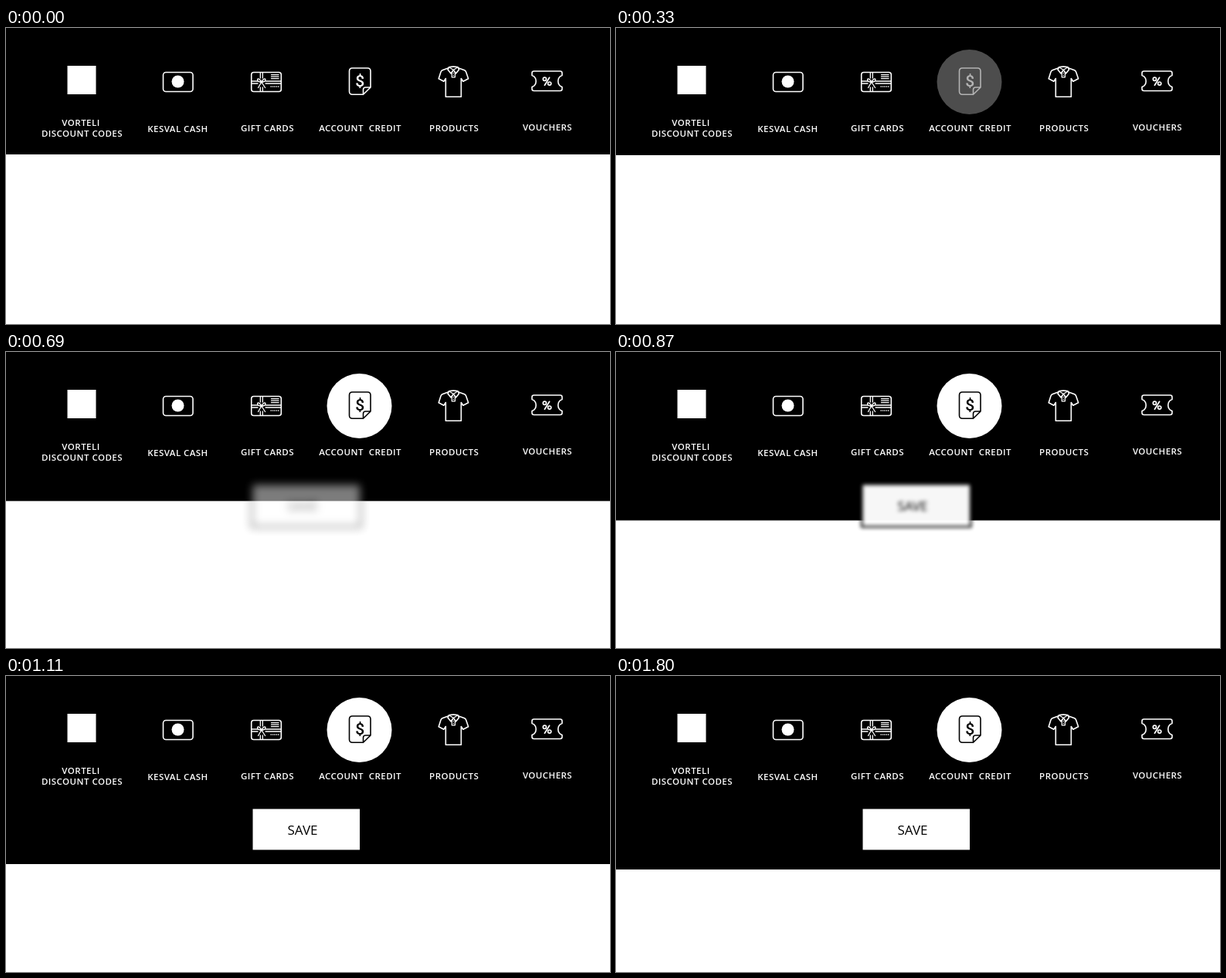
An HTML page for the animation above (1.83 s loop, 782 by 384 pixels).

```html
<!DOCTYPE html>
<html lang="en">
<head>
<meta charset="utf-8">
<title>Reward options</title>
<style>
  html, body { margin: 0; width: 100%; height: 100%; overflow: hidden; background: #fff; }
  svg { display: block; width: 100%; height: 100%; }
  .label {
    font: 600 11.5px "Open Sans", "Noto Sans", sans-serif;
    letter-spacing: .45px; text-anchor: middle; white-space: pre; fill: #fff;
  }
  .icon { fill: none; stroke: #fff; stroke-width: 1.6; stroke-linecap: round; stroke-linejoin: round; }
  .solid { fill: #fff; stroke: none; }
  .save { font: 17px "Open Sans", "Noto Sans", sans-serif; text-anchor: middle; }
  .dollar { font: 500 21px Roboto, sans-serif; text-anchor: middle; stroke: none; }
</style>
</head>
<body>
<svg viewBox="0 0 782 384">
  <defs>
    <filter id="soft" filterUnits="userSpaceOnUse" x="270" y="120" width="240" height="160" color-interpolation-filters="sRGB">
      <feGaussianBlur id="blur" stdDeviation="0"/>
    </filter>
  </defs>

  <rect id="panel" width="782" height="164"/>

  <!-- discount codes -->
  <rect class="solid" x="79.5" y="49" width="37" height="37"/>

  <!-- cash -->
  <g class="icon">
    <rect x="203.5" y="57.5" width="38.5" height="25" rx="3.5"/>
    <circle class="solid" cx="222.5" cy="69.5" r="8"/>
  </g>

  <!-- gift card -->
  <g class="icon">
    <rect x="317.7" y="57.5" width="38.6" height="25" rx="3"/>
    <g stroke-width="1.3">
      <path d="M318 69H326M318 72H326M336 69H356M336 72H356M329.3 58V65M332.3 58V65M329.3 77V82M332.3 77V82"/>
      <path d="M330.8 70Q325 70 325.5 66.5Q327.5 64.5 330.8 70Q334 64.5 336 66.5Q336.5 70 330.8 70L326.5 77.5M330.8 70L335.5 77.5"/>
      <path d="M343.5 60.7H353M343.5 63.2H353M343.5 65.7H353"/>
      <path d="M343 76H354" stroke-dasharray=".4 2"/>
    </g>
    <circle class="solid" cx="330.8" cy="70" r="1.8"/>
  </g>

  <!-- account credit -->
  <circle id="spot" cx="457.5" cy="70" r="42" fill="#fff" opacity="0"/>
  <g id="note" class="icon">
    <path d="M462.5 86.3H448.5Q444.5 86.3 444.5 82.3V56Q444.5 52 448.5 52H468Q472 52 472 56V77L462.5 86.3V80Q462.5 77 465.5 77H472"/>
    <text id="dollar" class="dollar" x="458.2" y="75.5">$</text>
  </g>

  <!-- products -->
  <g class="icon" stroke-width="1.5">
    <path d="M572.5 52L565 54.8Q563.6 55.4 563 57L560.2 65.7L566.8 69.2L569.3 65.5V89.3H589.3V65.5L591.8 69.2L598.6 65.7L595.6 57Q595 55.4 593.6 54.8L586 52"/>
    <path d="M573.5 50.8Q579.3 49.5 585 50.8L586.5 54L582.5 59L579.3 54.5L576 59L572 54Z"/>
    <path d="M573.5 50.8L579.3 54.5L585 50.8M577.2 58V63.8H581.4V58" stroke-width="1.2"/>
    <path d="M579.3 58.5V58.6M579.3 61.5V61.6" stroke-width="1.3"/>
  </g>

  <!-- vouchers -->
  <g class="icon">
    <path d="M683.5 56H717.5Q720 56 720 58.5V61.5A8 8 0 0 0 720 76.5V79Q720 81.5 717.5 81.5H683.5Q681 81.5 681 79V76.5A8 8 0 0 0 681 61.5V58.5Q681 56 683.5 56Z"/>
    <g stroke-width="1.7">
      <circle cx="697.4" cy="66.3" r="2.1"/>
      <circle cx="703.7" cy="72.1" r="2.1"/>
      <path d="M703.6 64.3L697.4 74.2"/>
    </g>
  </g>

  <g id="labels"></g>

  <g id="button" opacity="0">
    <rect x="317" y="170" width="143.5" height="58"/>
    <rect x="319.5" y="172.5" width="138.5" height="53" fill="#fff"/>
    <text class="save" x="384" y="206.2">SAVE</text>
  </g>
</svg>

<script>
  const LOOP = 1830, STEP = 30;
  const $ = id => document.getElementById(id);
  const set = (id, name, value) => $(id).setAttribute(name, value);

  const labels = [
    ["VORTELI", 97, 127.2], ["DISCOUNT CODES", 98.5, 140.8], ["KESVAL CASH", 222.5, 135.3],
    ["GIFT CARDS", 338.5, 134.3], ["ACCOUNT  CREDIT", 458.6, 134.1],
    ["PRODUCTS", 580.2, 134.1], ["VOUCHERS", 701, 133.4]
  ];
  for (const [text, x, y] of labels) {
    const el = document.createElementNS($("labels").namespaceURI, "text");
    el.setAttribute("class", "label");
    el.setAttribute("x", x);
    el.setAttribute("y", y);
    el.textContent = text;
    $("labels").append(el);
  }

  // Smooth curve through [time, value] keys, without overshoot and flat at both ends.
  function curve(...keys) {
    const slope = keys.slice(1).map(([t, v], i) => (v - keys[i][1]) / (t - keys[i][0]));
    const tangent = keys.map((_, i) => {
      const a = slope[i - 1] || 0, b = slope[i] || 0;
      return a * b > 0 ? 2 * a * b / (a + b) : 0;
    });
    return t => {
      if (t <= keys[0][0]) return keys[0][1];
      const i = keys.findIndex(k => k[0] > t) - 1;
      if (i < 0) return keys[keys.length - 1][1];
      const [t0, v0] = keys[i], [t1, v1] = keys[i + 1];
      const d = t1 - t0, u = (t - t0) / d, w = 1 - u;
      return v0 * w * w * (1 + 2 * u) + v1 * u * u * (3 - 2 * u)
        + d * u * w * (tangent[i] * w - tangent[i + 1] * u);
    };
  }

  const panelHeight = curve([60, 164], [330, 165], [540, 176], [870, 218.5], [1110, 244], [1320, 250.5], [1500, 251]);
  const spotFade = curve([30, 0], [330, .3], [540, .99], [600, 1]);
  const buttonFade = curve([480, 0], [540, .05], [870, .97], [990, 1]);
  const buttonBlur = curve([480, 9], [540, 8], [870, 2.8], [1090, 0]);

  function draw(t) {
    set("panel", "height", panelHeight(t));

    const spot = spotFade(t);
    const tone = Math.round(255 * (1 - spot));
    const ink = `rgb(${tone},${tone},${tone})`;
    set("spot", "opacity", spot);
    $("note").style.stroke = ink;
    $("dollar").style.fill = ink;

    const blur = buttonBlur(t);
    set("button", "opacity", buttonFade(t));
    set("button", "filter", blur > .05 ? "url(#soft)" : "none");
    set("blur", "stdDeviation", blur);
  }

  const start = performance.now();
  function tick() {
    const t = (performance.now() - start) % LOOP;
    draw(Math.floor(t / STEP) * STEP);
    requestAnimationFrame(tick);
  }
  tick();
</script>
</body>
</html>
```
